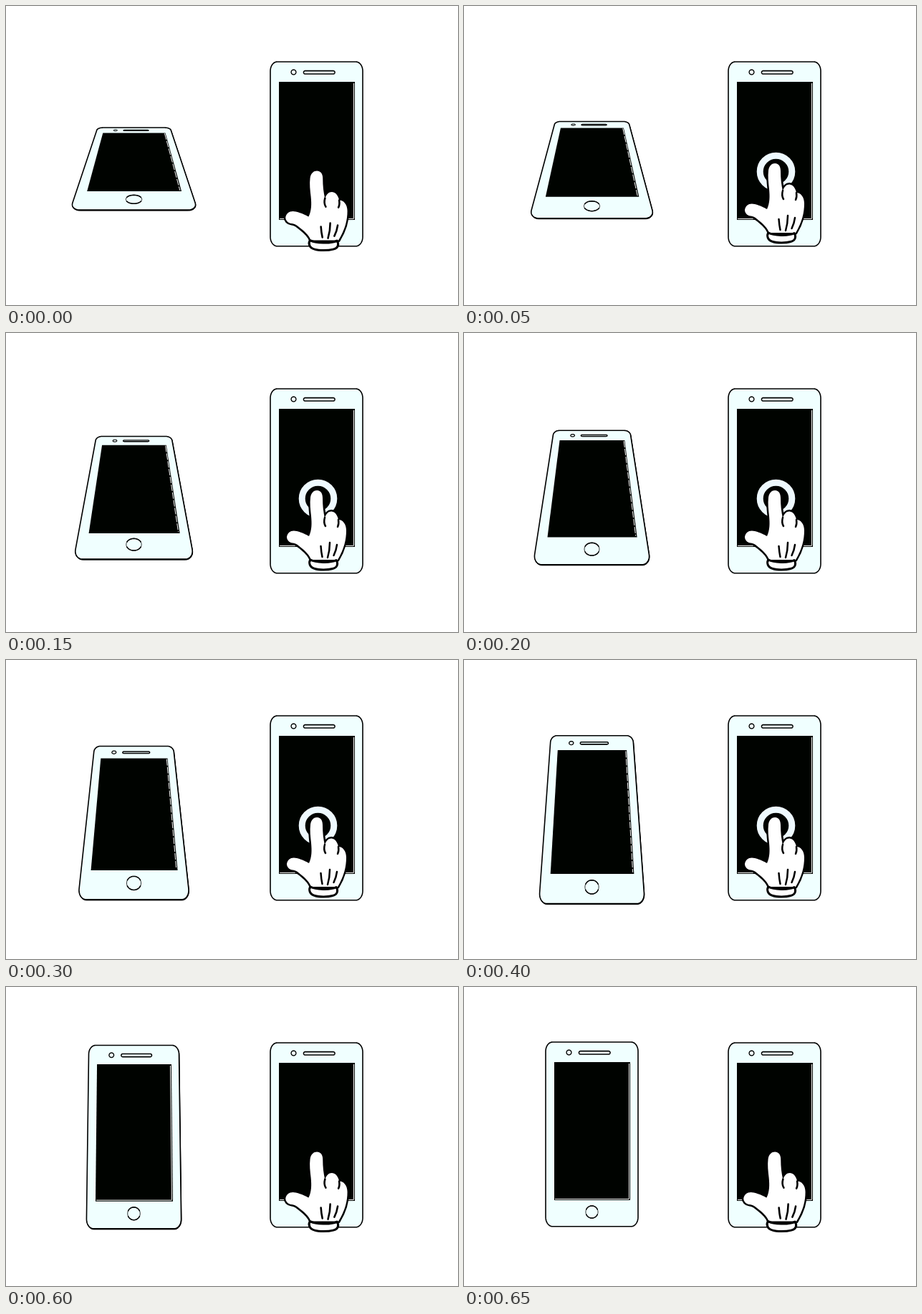
Animation of 631x418 px, one loop 0.7 s. Source, as an HTML page with a canvas:

```html
<!DOCTYPE html>
<html lang="en">
<head>
<meta charset="utf-8">
<title>Phone tilt</title>
<style>
  html, body { margin: 0; width: 100%; height: 100%; overflow: hidden; background: #fff; }
  canvas { display: block; }
</style>
</head>
<body>
<canvas id="stage" width="631" height="418"></canvas>
<script>
const ctx = document.getElementById('stage').getContext('2d');
const STEP = 50, STEPS = 14;
const BODY = '#f0ffff', RING = '#eef9fe', INK = '#000', SCREEN = '#000300';
const DEPTH = 425;

// Maps flat phone coordinates, measured from its centre, to the stage.
function makeProjection(cx, cy, degrees) {
  const a = degrees * Math.PI / 180, sin = Math.sin(a);
  const squash = Math.cos(a) * (1 - 0.025 * sin);
  const midY = cy + degrees * 0.09;
  return ([x, y]) => {
    const s = 1 / (1 - y * sin / DEPTH);
    return [cx + x * s, midY + y * squash * s];
  };
}

function arcPoints(x, y, rx, ry, from, to, n = 12) {
  return Array.from({ length: n + 1 }, (_, i) => {
    const a = (from + (to - from) * i / n) * Math.PI;
    return [x + rx * Math.cos(a), y + ry * Math.sin(a)];
  });
}

function roundRect(l, t, r, b, rx, ry = rx) {
  return [
    ...arcPoints(l + rx, t + ry, rx, ry, 1, 1.5),
    ...arcPoints(r - rx, t + ry, rx, ry, 1.5, 2),
    ...arcPoints(r - rx, b - ry, rx, ry, 0, 0.5),
    ...arcPoints(l + rx, b - ry, rx, ry, 0.5, 1)
  ];
}

function trace(points, closed) {
  ctx.beginPath();
  points.forEach(([x, y]) => ctx.lineTo(x, y));
  if (closed) ctx.closePath();
}

function shape(points, fill, stroke, width) {
  trace(points, true);
  ctx.fillStyle = fill;
  ctx.fill();
  if (!stroke) return;
  ctx.strokeStyle = stroke;
  ctx.lineWidth = width;
  ctx.stroke();
}

function line(points, color, width) {
  trace(points, false);
  ctx.strokeStyle = color;
  ctx.lineWidth = width;
  ctx.stroke();
}

function drawPhone(cx, cy, tilt, hasHome) {
  const project = makeProjection(cx, cy, tilt);
  const map = points => points.map(project);
  const body = map(roundRect(-64.5, -129, 64.5, 128.7, 9.5, 13));
  const detail = 0.8 + 0.8 * Math.cos(tilt * Math.PI / 180);

  if (tilt > 0) {
    shape(body.map(([x, y]) => [x + 0.4, y + 1]), INK, INK, 1);
  }
  shape(body, BODY, INK, 1.6);
  shape(map(arcPoints(-32, -114.5, 3.4, 3.4, 0, 2, 20)), BODY, INK, detail * 0.85);
  shape(map(roundRect(-18, -116.4, 25.5, -112, 2.1)), BODY, INK, detail);

  shape(map([[-52.5, -101], [53.5, -101], [53.5, 92], [-52.5, 92]]), SCREEN);
  ctx.setLineDash(tilt > 5 ? [9, 2] : []);
  line(map([[52, -99], [52, 90]]), '#fff', 1);
  ctx.setLineDash([]);
  if (tilt <= 5) line(map([[-51.5, 90.5], [52, 90.5]]), '#fff', 1);

  if (hasHome) {
    line(map(arcPoints(0, 108.5, 8.6, 8.6, 0, 2, 28)), INK, 0.8);
    line(map(arcPoints(0, 108.5, 8.6, 8.6, 0.12, 0.88)), INK, 1.5);
    line(map(arcPoints(0, 108.5, 8.6, 8.6, 1.12, 1.88)), INK, 1.5);
  }
}

const hand = new Path2D(`M423 284 C427 275 427 267 426 256 C425 247 424 238 425 230
  C426 223 430 220 434 220 C440 220 442 225 442 231 C442 241 443 250 445 259
  C448 246 461 246 464 261 C470 261 475 267 475 276
  C475 289 472 302 463 317 L426 317
  C424 311 418 305 413 301 C407 296 405 294 400 293.5 C395 293 392 289 392 285
  C393 278 399 275 406 277 C414 279 419 282 423 284 Z`);
const creases = new Path2D(`M445 258 Q443 265 446 270 M464 261 Q465 267 463 271
  M439.5 298 Q440 306 441.5 313 M452 293 Q452 304 449 314 M462 296 Q461 304 457.5 311`);
const cuff = new Path2D(`M425 317 C432 321 453 322 461 317.5 C464 322 463 328 456 329.5
  C449 331.5 437 331.5 431 329.5 C424 328 422 321 425 317 Z`);

function drawHand(pressed) {
  ctx.save();
  if (!pressed) {
    ctx.translate(436, 10.6);
    ctx.scale(1.04, 1);
    ctx.translate(-436, 0);
  }
  ctx.lineCap = ctx.lineJoin = 'round';
  ctx.strokeStyle = INK;
  ctx.fillStyle = '#fff';
  ctx.lineWidth = 5;
  ctx.stroke(hand);
  ctx.fill(hand);
  ctx.lineWidth = 2.5;
  ctx.stroke(creases);
  ctx.lineWidth = 3;
  ctx.fill(cuff);
  ctx.stroke(cuff);
  ctx.restore();
}

function drawRing() {
  ctx.beginPath();
  ctx.arc(435.5, 231.5, 22.3, 0, Math.PI * 2);
  ctx.strokeStyle = RING;
  ctx.lineWidth = 9;
  ctx.stroke();
}

function render(now) {
  const step = Math.floor(now / STEP) % STEPS;
  const pressed = step >= 1 && step <= 11;
  ctx.fillStyle = '#fff';
  ctx.fillRect(0, 0, 631, 418);
  drawPhone(178.5, 206, 65 - step * 5, true);
  drawPhone(433.5, 207, 0, false);
  if (pressed) drawRing();
  drawHand(pressed);
}

const start = performance.now();
function loop() {
  render(performance.now() - start);
  requestAnimationFrame(loop);
}
loop();
</script>
</body>
</html>
```
